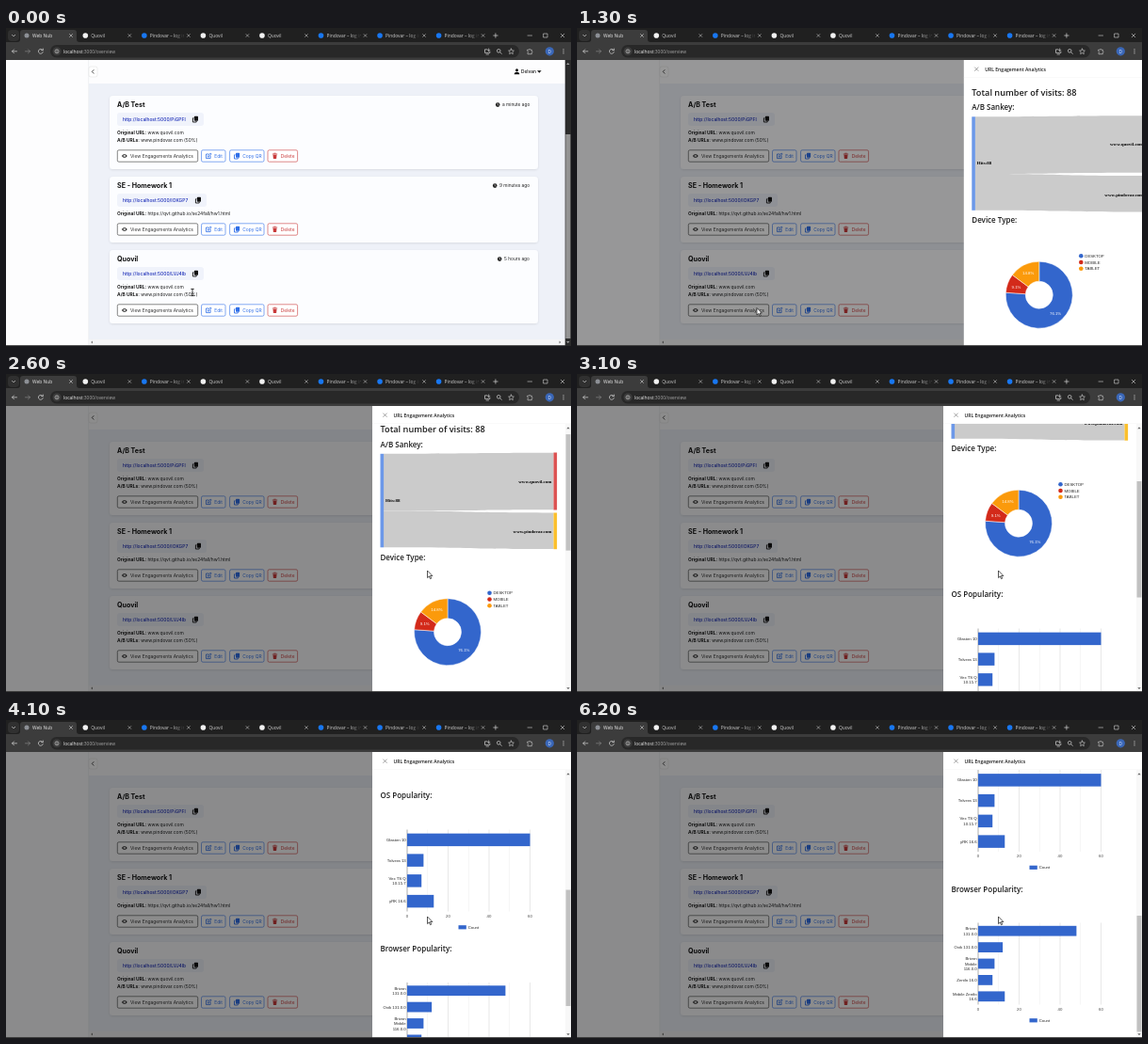
Recreate the animation shown at these times as an HTML page. Size 600 px wide and 338 px high, loop 6.3 s.

```html
<!DOCTYPE html>
<html lang="en">
<head>
<meta charset="utf-8">
<title>Link dashboard</title>
<style>
  html, body { margin: 0; width: 100%; height: 100%; overflow: hidden; background: #202020; }
  svg { display: block; }
  .ui { font-family: Inter, sans-serif; }
  .sys { font-family: "Open Sans", sans-serif; }
  .chart { font-family: "Liberation Sans", sans-serif; }
  .serif { font-family: "Liberation Serif", serif; font-weight: 700; }
  .hover > rect { fill: #555; }
  .hover > text { fill: #bdbdbd; }
  .hover > g { filter: invert(1); }
</style>
</head>
<body>
<svg id="stage" width="100%" height="100%" viewBox="0 0 600 338"></svg>
<script>
const LOOP = 6300, STEP = 100;
const SITE_A = "Quovil", SITE_B = "Pindovar";
const HOST_A = "www.quovil.com", HOST_B = "www.pindovar.com";

// SVG helpers
const rect = (x, y, w, h, fill, more = "") =>
  `<rect x="${x}" y="${y}" width="${w}" height="${h}" fill="${fill}" ${more}/>`;
const dot = (x, y, r, fill, more = "") => `<circle cx="${x}" cy="${y}" r="${r}" fill="${fill}" ${more}/>`;
const line = (d, color, width = 0.7) =>
  `<path d="${d}" fill="none" stroke="${color}" stroke-width="${width}" stroke-linecap="round" stroke-linejoin="round"/>`;
const shape = (d, fill, more = "") => `<path d="${d}" fill="${fill}" ${more}/>`;
const text = (x, y, s, size, fill, cls, more = "") =>
  `<text x="${x}" y="${y}" font-size="${size}" fill="${fill}" class="${cls}" ${more}>${s}</text>`;
const clip = (x, y, w, h, body) =>
  `<svg x="${x}" y="${y}" width="${w}" height="${h}" viewBox="${x} ${y} ${w} ${h}">${body}</svg>`;
const cross = (x, y, r, color, width) =>
  line(`M${x - r} ${y - r}l${2 * r} ${2 * r}m0 ${-2 * r}l${-2 * r} ${2 * r}`, color, width);
const END = 'text-anchor="end"', MID = 'text-anchor="middle"';
const weight = w => `font-weight="${w}"`;

function browserBar() {
  const ink = "#d6d6d6";
  let out = rect(0, 0, 600, 15, "#202020") + rect(0, 15, 600, 19, "#3c3c3c")
    + rect(2, 2, 12, 12, "#303030", 'rx="4"') + line("M6.5 7.3l1.6 1.6 1.6-1.6", ink)
    + shape("M12 15q3 0 3-3V5q0-3 3-3H72q3 0 3 3v7q0 3 3 3z", "#3c3c3c")
    + dot(22, 8, 2.5, "#8d9096") + text(28, 9.8, "Web Nub", 4.9, "#e8e8e8", "sys") + cross(69, 8, 1.5, ink, 0.6);
  [0, 1, 0, 0, 1, 1, 1].forEach((second, i) => {
    const x = 90.3 + i * 62.55;
    const title = second ? SITE_B + " – log in" : SITE_A;
    out += dot(x - 6, 8, 2.8, second ? "#1877f2" : "#f1f1f1")
      + clip(x, 2, 36, 12, text(x, 9.8, title, 4.9, "#d0d0d0", "sys") + rect(x + 26, 2, 10, 12, "url(#tabFade)"))
      + cross(x + 41, 8, 1.4, "#c4c4c4", 0.6);
  });
  out += line("M517.7 8h4.4m-2.2-2.2v4.4", ink)
    + line("M554 8h4.5M571 6h4v4h-4z", ink, 0.6) + cross(591, 8, 1.8, ink, 0.6);
  out += line("M11.5 24.8h-5m2-2l-2 2 2 2", ink) + line("M20.5 24.8h5m-2-2l2 2-2 2", "#858585")
    + line("M39 23.4a2.5 2.5 0 1 0 .3 2.2m0-3.6v1.7h-1.8", ink)
    + rect(47, 18, 498, 13.5, "#282828", 'rx="6.7"') + dot(54, 24.8, 4.5, "#3c3c3c")
    + dot(54, 24.8, 2, "none", `stroke="${ink}" stroke-width=".6"`) + line("M54 24.8v.9M54 23.7v.1", ink, 0.6)
    + text(61, 26.6, 'localhost<tspan fill="#a8a8a8">:3000/overview</tspan>', 4.9, "#f0f0f0", "sys")
    + line("M511 22.8h-2.5v3.6h5.4v-1.2M510 28h2.5M512.7 22v2.5m-1-1l1 1 1-1", ink, 0.7)
    + dot(523.2, 24.3, 1.8, "none", `stroke="${ink}" stroke-width=".7"`) + line("M524.6 25.7l1.7 1.7", ink)
    + line("M536.5 22l.9 1.9 2 .2-1.5 1.4.4 2.1-1.8-1-1.8 1 .4-2.1-1.5-1.4 2-.2z", ink, 0.6)
    + line("M554 23.2h1.4q.6-2 1.4 0h1.5v1.5q1.9.6 0 1.5v1.5H554v-1.5q1.4-.7 0-1.5z", ink, 0.6)
    + dot(577.3, 24.8, 4.6, "#3a67b8") + text(577.3, 26.5, "D", 4.6, "#dfe8fa", "sys", MID);
  for (const y of [22.8, 24.8, 26.8]) out += dot(592, y, 0.6, ink);
  return out;
}

const BLUE = "#2f6fe8", RED = "#c93a3a";

function button(x, y, w, label, color, icon, id = "") {
  return `<g ${id && `id="${id}"`}>` + rect(x, y - 6.2, w, 12.4, "#fff", `rx="1.6" stroke="${color}" stroke-width=".6"`)
    + `<g transform="translate(${x + 7.5} ${y})">${icon}</g>`
    + text(x + 13.7, y + 1.8, label, 4.9, color, "ui") + "</g>";
}

const copyIcon = c => rect(-1.1, -3.2, 4.1, 4.9, c, 'rx=".6"') + line("M-1.9-1.2h-.7v4.2h3.8v-.6", c, 0.9);
const icons = {
  eye: shape("M-3 0Q0-4.2 3 0 0 4.2-3 0z", "#333") + dot(0, 0, 1.2, "#fff") + dot(0, 0, 0.6, "#333"),
  pen: line("M0-2h-2.5v4.6h4.6V.3M-.6.8l.2-1.2 2.6-2.5 1 1-2.6 2.5z", BLUE, 0.8),
  copy: copyIcon(BLUE),
  bin: line("M-2.3-2h4.6M-.8-2.8h1.6", RED, 0.8) + shape("M-2-1.3h4l-.4 4.3h-3.2z", RED)
};

function card(c, i) {
  const { y, name, path, copyX, host, ago, agoX } = c;
  const by = y + (c.ab ? 64 : 56);
  let out = rect(110, y, 455, by + 14 - y, "#fcfdff", 'rx="3.5" filter="url(#soft)"')
    + text(118, y + 12, name, 7.1, "#111", "ui", weight(700))
    + rect(118, y + 18, copyX - 109, 14, "#f0f3fb", 'rx="3"')
    + text(124, y + 26.8, "http://localhost:5000/" + path, 4.9, "#1a2cb8", "ui", weight(500))
    + `<g transform="translate(${copyX} ${y + 25})">${copyIcon("#111")}</g>`;
  const field = (fy, label, value) =>
    text(118, fy, `<tspan font-weight="700">${label}</tspan> ${value}`, 4.9, "#1b1b1b", "ui");
  out += field(y + 41.1, "Original URL:", host);
  if (c.ab) out += field(y + 48.8, "A/B URLs:", HOST_B + " (50%)");
  out += `<g id="ago${i}" transform="translate(${agoX} ${y + 9.6})">` + dot(-4.8, 0, 2.3, "#222")
    + line("M-4.8-1.3v1.4l.9.5", "#fff", 0.5) + text(0, 1.8, ago, 4.8, "#222", "ui") + "</g>";
  return out + button(118.3, by, 85.4, "View Engagements Analytics", "#333", icons.eye, "view" + i)
    + button(207.5, by, 25.5, "Edit", BLUE, icons.pen)
    + button(237.6, by, 36.4, "Copy QR", BLUE, icons.copy)
    + button(278, by, 31.6, "Delete", RED, icons.bin);
}

const cards = [
  { y: 72, name: "A/B Test", path: "PiGPFl", copyX: 201, host: HOST_A, ab: true, ago: "a minute ago", agoX: 527 },
  { y: 158, name: "SE - Homework 1", path: "IOKGP7", copyX: 204, host: "https://qvt.github.io/se24fall/hw1.html", ago: "9 minutes ago", agoX: 524 },
  { y: 236, name: SITE_A, path: "LVJ4Ib", copyX: 201, host: HOST_A, ab: true, ago: "5 hours ago", agoX: 529 }
];

function page() {
  return rect(0, 34, 600, 304, "#fdfdfe") + rect(88, 59, 506, 272, "#eef1f8")
    + rect(87.6, 34, 0.5, 303, "#e2e4e8")
    + rect(88, 41, 9, 11, "#fff", 'rx="2" stroke="#ddd" stroke-width=".5"') + line("M93 44.6l-1.7 1.8 1.7 1.8", "#222", 0.8)
    + dot(542.5, 44.8, 1.5, "#111") + shape("M539.7 49.2q0-2.5 2.8-2.5t2.8 2.5z", "#111")
    + text(547, 48.1, "Delvan", 4.8, "#111", "ui", weight(500)) + shape("M564 45.3h4.6l-2.3 2.5z", "#111")
    + cards.map(card).join("")
    + rect(88, 331, 506, 6.2, "#f4f4f5") + shape("M92 332.5v3l-1.8-1.5z", "#777") + shape("M587.5 332.5v3l1.8-1.5z", "#777")
    + rect(593.7, 34, 6.3, 304, "#2c2c2c") + rect(594.3, 113, 5.1, 217, "#949494")
    + shape("M595 39h3.6l-1.8-2zM595 333h3.6l-1.8 2z", "#9f9f9f");
}

function sankey() {
  const flow = (l0, l1, r0, r1) => shape(
    `M401 ${l0}C491 ${l0} 491 ${r0} 581.5 ${r0}V${r1}C491 ${r1} 491 ${l1} 401 ${l1}z`, "#cbcbcb");
  return flow(94.3, 155, 93.2, 153.8) + flow(155, 193.7, 157, 195.5)
    + rect(397.5, 94.3, 3.6, 99.5, "#6c98e8") + rect(581.5, 93, 3.6, 61, "#dc5353") + rect(581.5, 157, 3.6, 38.7, "#fbc02d")
    + text(403, 145.2, "Hits:88", 5, "#000", "serif")
    + text(579.5, 125.2, HOST_A, 5, "#000", "serif", END)
    + text(579.5, 178.8, HOST_B, 5, "#000", "serif", END);
}

function donut(cx, cy, outer, inner) {
  const slices = [["DESKTOP", 76.1, "#3366cc", 486.3, 304.5], ["MOBILE", 9.1, "#d32a1a", 444.7, 276.6], ["TABLET", 14.8, "#fb9a0b", 457.4, 261.8]];
  let from = 0, out = "";
  slices.forEach(([label, share, color, x, y], i) => {
    const to = from + share / 100 * 2 * Math.PI, big = share > 50 ? 1 : 0;
    const at = (r, a) => `${cx + r * Math.sin(a)} ${cy - r * Math.cos(a)}`;
    out += shape(`M${at(outer, from)}A${outer} ${outer} 0 ${big} 1 ${at(outer, to)}L${at(inner, to)}A${inner} ${inner} 0 ${big} 0 ${at(inner, from)}z`,
      color, 'stroke="#fff" stroke-width=".5"')
      + text(x, y, share + "%", 4.3, "#fff", "chart", MID)
      + dot(513.5, 242.2 + i * 6.75, 2.3, color) + text(517.5, 243.8 + i * 6.75, label, 4.3, "#222", "chart");
    from = to;
  });
  return out;
}

function bars(top, rows) {
  const left = 426, unit = 2.175, height = 87, step = height / rows.length;
  let out = "";
  for (let v = 0; v <= 60; v += 10) {
    const x = left + v * unit, major = v % 20 === 0;
    out += rect(x - 0.2, top, 0.4, height, v === 0 ? "#333" : major ? "#c4c4c4" : "#e8e8e8");
    if (major) out += text(x, top + 93.3, v, 4.3, "#444", "chart", MID);
  }
  rows.forEach(([label, value], i) => {
    const y = top + step * (i + 0.5), lines = label.split("|");
    out += rect(left, y - step * 0.31, value * unit, step * 0.62, "#3366cc");
    lines.forEach((s, k) => out += text(424.7, y + 1.6 + (k - (lines.length - 1) / 2) * 5.5, s, 4.3, "#222", "chart", END));
  });
  return out + rect(480.5, top + 101.7, 8.3, 4.2, "#3366cc") + text(490.7, top + 105.4, "Count", 4.3, "#222", "chart");
}

function panel() {
  const heading = (y, s, size = 8) => text(397.5, y, s, size, "#1c1c1c", "sys", weight(600));
  const content = heading(71.5, "Total number of visits: 88", 9.2) + heading(87, "A/B Sankey:") + sankey()
    + heading(207, "Device Type:") + donut(469, 283.7, 35.5, 14.5)
    + heading(362.4, "OS Popularity:")
    + bars(395.5, [["Glasten 10", 60], ["Tolvera 13", 8], ["Vex TS Q|10.15.7", 7], ["yRK 16.6", 13]])
    + heading(525, "Browser Popularity:")
    + bars(558, [["Brivon|131.0.0", 48], ["Ovik 131.0.0", 12], ["Brivon|Mobile|116.0.0", 8], ["Zentlo 16.0", 7], ["Mobile Zentlo|16.6", 13]]);
  return rect(389, 34, 211, 304, "#fff") + cross(402.5, 43.7, 1.8, "#666", 0.6)
    + text(411.5, 45.5, "URL Engagement Analytics", 5.05, "#1c1c1c", "sys", weight(600))
    + rect(389, 52.7, 211, 0.3, "#eee")
    + clip(389, 53, 205, 284, `<g id="content">${content}</g>`)
    + rect(594, 53, 6, 284, "#f8f8f8") + shape("M595.3 58.2h3.4l-1.7-2zM595.3 333.2h3.4l-1.7 2z", "#666")
    + rect(594.5, 60, 5, 123.5, "#c1c1c1", 'id="thumb"');
}

const stage = document.getElementById("stage");
stage.innerHTML = `<defs>
  <linearGradient id="tabFade"><stop stop-color="#202020" stop-opacity="0"/><stop offset="1" stop-color="#202020"/></linearGradient>
  <filter id="soft" x="-5%" y="-10%" width="110%" height="125%"><feDropShadow dx="0" dy=".8" stdDeviation="1.2" flood-opacity=".1"/></filter>
  </defs>`
  + page() + rect(0, 34, 600, 304, "#000", 'id="mask"') + `<g id="panel">${panel()}</g>` + browserBar()
  + rect(0, 337.2, 600, 0.8, "#2a2a2a")
  + `<g id="cursor"><g id="beam">${line("M-1.3-3.6h2.6M0-3.6v7.2M-1.3 3.6h2.6", "#111", 0.8)}</g><g id="arrow">`
  + shape("M0 0v7.6l1.8-1.6 1.2 2.7 1.2-.5-1.2-2.7h2.4z", "#fff", 'stroke="#111" stroke-width=".7"') + "</g></g>";

const $ = id => document.getElementById(id);
const [mask, drawer, content, thumb, cursor, beam, arrow, viewButton, agoGroup] =
  ["mask", "panel", "content", "thumb", "cursor", "beam", "arrow", "view2", "ago1"].map($);
const agoLabel = agoGroup.querySelector("text");

// Piecewise linear value from [time, value] keys
function track(keys, t) {
  const i = keys.findIndex(k => k[0] > t);
  if (i < 0) return keys[keys.length - 1][1];
  if (i === 0) return keys[0][1];
  const [t0, a] = keys[i - 1], [t1, b] = keys[i];
  return a + (b - a) * (t - t0) / (t1 - t0);
}
const cursorX = [[200, 198], [600, 191], [1300, 191], [1700, 404.5], [2100, 404.5], [2400, 447.5]];
const cursorY = [[200, 281], [600, 297.5], [1300, 297.5], [1700, 218], [2100, 218], [2400, 209]];
const scrolling = [[2500, 0], [2600, 9.5], [3100, 125], [4100, 279], [4500, 342.5]];

function draw(t) {
  const open = 1 - (1 - Math.min(1, Math.max(0, (t - 1190.5) / 300))) ** 5;
  mask.setAttribute("opacity", 0.45 * open);
  drawer.setAttribute("transform", `translate(${211 * (1 - open)} 0)`);

  const scroll = track(scrolling, t);
  content.setAttribute("transform", `translate(0 ${-scroll})`);
  thumb.setAttribute("y", 60 + scroll * 0.432);

  cursor.setAttribute("transform", `translate(${track(cursorX, t)} ${track(cursorY, t)})`);
  const overText = t < 400;
  beam.setAttribute("visibility", overText ? "visible" : "hidden");
  arrow.setAttribute("visibility", overText ? "hidden" : "visible");
  viewButton.classList.toggle("hover", t >= 500 && t < 1300);

  const later = t >= 600;
  agoLabel.textContent = later ? "10 minutes ago" : cards[1].ago;
  agoGroup.setAttribute("transform", `translate(${later ? 520.5 : cards[1].agoX} 167.6)`);
}

function tick() {
  draw(Math.floor(performance.now() % LOOP / STEP) * STEP);
  requestAnimationFrame(tick);
}
tick();
</script>
</body>
</html>
```
